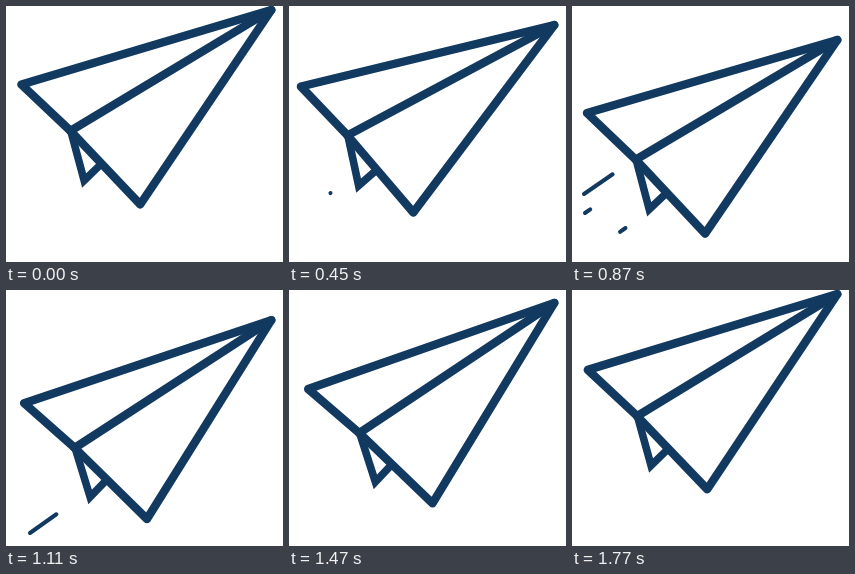
An HTML page with a canvas that plays this animation: 277x256 px, repeating every 1.8 s.

```html
<!DOCTYPE html>
<html lang="en">
<head>
<meta charset="utf-8">
<title>Paper plane</title>
<style>
html, body { margin: 0; width: 100%; height: 100%; overflow: hidden; background: #fff; }
canvas { display: block; }
</style>
</head>
<body>
<canvas id="stage" width="277" height="256"></canvas>
<script>
const ctx = document.getElementById('stage').getContext('2d');
const LOOP = 1800, STEP = 30;
const INK = '#12395f';

// Plane corners, relative to the nose
const nose = [0, 0], wing = [-250, 74.1], fold = [-201, 120.6], belly = [-131.4, 194.3];
const flap = [[-200.6, 121], [-187.4, 170.2], [-171, 154.4]];

// Speed lines: start time, right end, left end
const trails = [
  { start: 444, from: [41.5, 187], to: [13, 207] },
  { start: 602, from: [41, 168], to: [12, 188] },
  { start: 808, from: [53.5, 222], to: [24, 243] }
];
const GROW = 220, HOLD = 250, SHRINK = 245;

const ease = x => (1 - Math.cos(Math.PI * Math.min(1, Math.max(0, x)))) / 2;
const mix = (a, b, k) => a.map((v, i) => v + (b[i] - v) * k);

function stroke(points, width, join, closed) {
  ctx.lineWidth = width;
  ctx.lineJoin = join;
  ctx.beginPath();
  points.forEach(p => ctx.lineTo(p[0], p[1]));
  if (closed) ctx.closePath();
  ctx.stroke();
}

function drawPlane(t) {
  const phase = 2 * Math.PI * t / LOOP;
  const tilt = 2.95 * Math.sin(phase) - 0.08;
  ctx.save();
  ctx.translate(265.3, 19 - 15 * Math.cos(phase));
  ctx.rotate(tilt * Math.PI / 180);
  stroke(flap, 7.6, 'miter');
  stroke([nose, wing, fold, belly], 8.4, 'round', true);
  stroke([nose, fold], 8.4, 'round');
  ctx.restore();
}

function drawTrail({ start, from, to }, t) {
  const age = t - start;
  if (age <= 0 || age >= HOLD + SHRINK) return;
  const head = mix(from, to, ease(age / GROW));
  const tail = mix(from, to, ease((age - HOLD) / SHRINK));
  stroke([tail, head], 4, 'round');
}

function frame() {
  const t = Math.floor(performance.now() % LOOP / STEP) * STEP;
  ctx.fillStyle = '#fff';
  ctx.fillRect(0, 0, 277, 256);
  ctx.strokeStyle = INK;
  ctx.lineCap = 'round';
  trails.forEach(line => drawTrail(line, t));
  drawPlane(t);
  requestAnimationFrame(frame);
}
frame();
</script>
</body>
</html>
```
